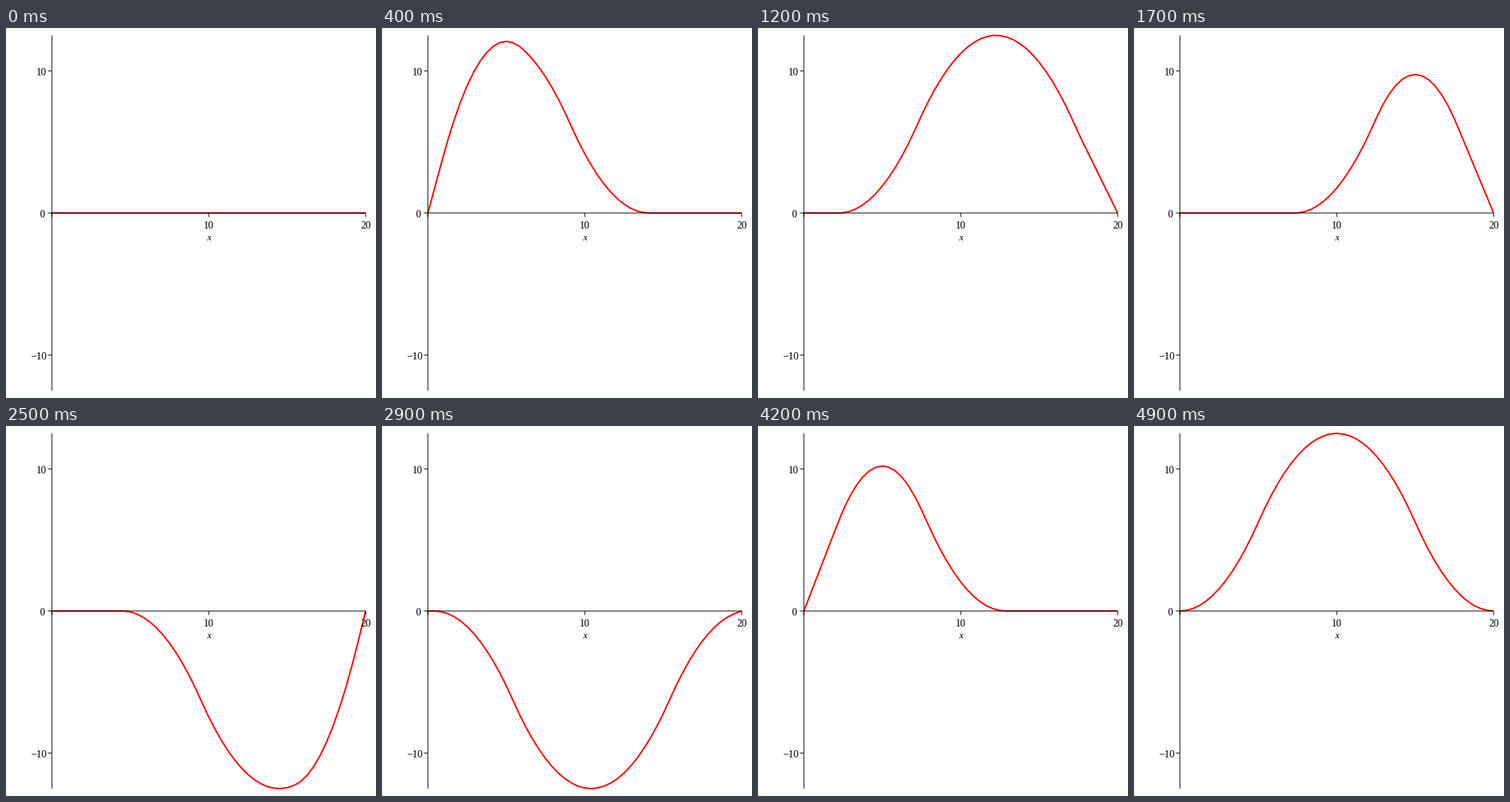
These frames come from a looping animation (500 px wide and 500 px high, 5 s). A matplotlib script:

```python
import numpy as np
import matplotlib.pyplot as plt
from matplotlib.animation import FuncAnimation

SIZE, DPI = 500, 100
FRAMES, INTERVAL = 50, 100
LENGTH, END_TIME = 20, 50
X0, Y0, X_UNIT, Y_UNIT = 62, 250, 21.2, 19.2
PT = 72 / DPI  # points per pixel


def px(x):
    return X0 + X_UNIT * np.asarray(x)


def py(y):
    return Y0 - Y_UNIT * np.asarray(y)


def impulse(z):
    """Integral of a triangular velocity pulse on [0, 10], even and 40-periodic."""
    z = np.abs((z + LENGTH) % (2 * LENGTH) - LENGTH)
    z = np.minimum(z, 10)
    return np.where(z < 5, z**2 / 4, 12.5 - (10 - z)**2 / 4)


def string_shape(x, t):
    """d'Alembert solution for a string with fixed ends."""
    return impulse(x + t) - impulse(x - t)


fig = plt.figure(figsize=(SIZE / DPI, SIZE / DPI), dpi=DPI, facecolor="white")
ax = fig.add_axes([0, 0, 1, 1])
ax.set_xlim(0, SIZE)
ax.set_ylim(SIZE, 0)
ax.axis("off")


def rule(xs, ys):
    ax.plot(xs, ys, color="black", lw=PT, snap=False, zorder=3,
            solid_capstyle="butt")


def label(x, baseline, text, ha="center", size=14, style="normal"):
    ax.text(x, baseline, text, ha=ha, va="baseline", fontsize=size * PT,
            family="Liberation Serif", style=style, color="black", zorder=4)


TICK = 5.5
rule([X0, X0], py([-12.5, 12.5]))
rule(px([0, LENGTH]), [Y0, Y0])
for value in (0, 10, 20):
    rule([px(value)] * 2, [Y0, Y0 + TICK])
    if value:
        label(px(value), 271, str(value))
for value, right in ((-10, 55), (0, 52.5), (10, 55)):
    rule([X0 - TICK, X0], [py(value)] * 2)
    label(right, py(value) + 5.5, str(value).replace("-", "\u2212"), ha="right")
label(274, 287, "x", size=13, style="italic")

xs = np.linspace(0, LENGTH, 49)
curve, = ax.plot(px(xs), py(0 * xs), color="red", lw=2 * PT, snap=False,
                 zorder=2, solid_capstyle="butt", solid_joinstyle="round")


def update(frame):
    t = END_TIME * frame / (FRAMES - 1)
    curve.set_ydata(py(string_shape(xs, t)))
    return curve,


anim = FuncAnimation(fig, update, frames=FRAMES, interval=INTERVAL,
                     repeat=True, repeat_delay=0)
plt.show()
```
